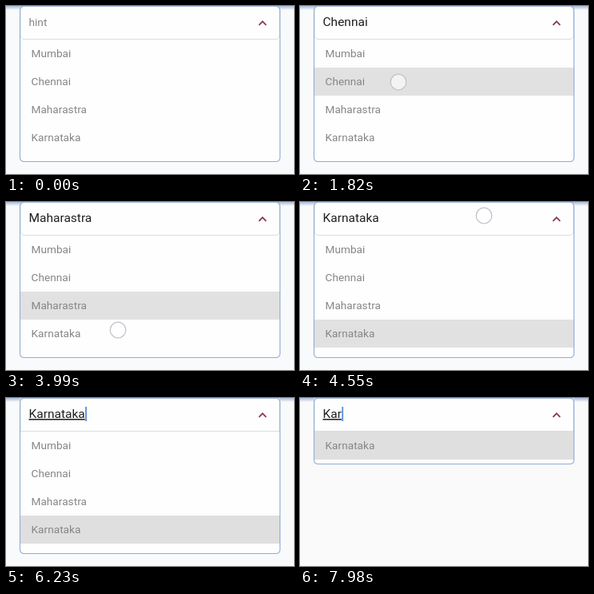
These frames come from a looping animation (360 by 210 pixels, 8000 ms). An HTML page:

```html
<!DOCTYPE html>
<html lang="en">
<head>
<meta charset="utf-8">
<title>Dropdown with search</title>
<style>
  html, body { margin: 0; width: 100%; height: 100%; overflow: hidden; background: #f9fafb; }
  svg { display: block; width: 360px; height: 210px; font-family: Roboto, sans-serif; }
  .item { font-size: 13.6px; letter-spacing: .04px; fill: #858585; }
  #value { font-size: 15.5px; fill: #202020; }
  #value.hint { font-size: 13.7px; fill: #858585; }
  #value.editing { text-decoration: underline; }
</style>
</head>
<body>
<svg viewBox="0 0 360 210">
  <defs>
    <linearGradient id="shade" x2="0" y2="1">
      <stop stop-color="#a9bad8"/>
      <stop offset="1" stop-color="#a9bad8" stop-opacity="0"/>
    </linearGradient>
  </defs>
  <rect id="back" width="360" height="210"/>
  <rect width="360" height="5" fill="url(#shade)"/>
  <rect id="panel" x="17.5" y="0.3" width="325" rx="5" fill="#fefefe"/>
  <rect id="mark" x="18" width="324"/>
  <g id="items"></g>
  <rect id="field" x="18" y="0.5" width="324" height="41" fill="#fefefe" stroke="#d9dde5"/>
  <rect id="border" x="17.5" y="0.3" width="325" rx="5" fill="none" stroke="#91add6" stroke-width="1.1"/>
  <text id="value" x="28.5" y="25"></text>
  <rect id="caret" y="11" width="1.8" height="18" fill="#5590d2"/>
  <path d="M316.2 23.8 L320.7 19.3 L325.2 23.8" fill="none" stroke="#8c3b50" stroke-width="1.8"/>
  <circle id="dot" r="9.8" fill="#fff" fill-opacity=".6" stroke="#c0c4cb" stroke-width="1.3"/>
</svg>
<script>
const LOOP = 8000, ROW = 35, TOP = 42;
const FOCUS = 5180, ERASE = 6510, ERASE_STEP = 280;
const names = ["Mumbai", "Chennai", "Maharastra", "Karnataka"];
const picks = [350, 1680, 3150, 4130];

// Touches: start, end, position
const taps = [
  { from: 70, to: 980, x: 118, y: 63 },
  { from: 1400, to: 2250, x: 123, y: 95 },
  { from: 2870, to: 3600, x: 132, y: 130 },
  { from: 3780, to: 4400, x: 140, y: 160 },
  { from: 4440, to: 5180, x: 230, y: 17 }
];

const $ = id => document.getElementById(id);
const set = (id, attrs) => {
  for (const key in attrs) $(id).setAttribute(key, attrs[key]);
};
const clamp = v => Math.max(0, Math.min(1, v));

const labels = names.map((name, i) => {
  const label = document.createElementNS("http://www.w3.org/2000/svg", "text");
  label.textContent = name;
  label.setAttribute("class", "item");
  label.setAttribute("x", 31.5);
  label.setAttribute("y", 64.4 + i * ROW);
  $("items").append(label);
  return label;
});

function draw(t) {
  const picked = picks.filter(time => t >= time).length - 1;
  const focused = t >= FOCUS;
  const erased = t < ERASE ? 0 : 1 + Math.floor((t - ERASE) / ERASE_STEP);
  const filtered = erased > 0;

  const value = $("value");
  const name = names[picked] || "hint";
  value.textContent = name.slice(0, name.length - erased);
  value.setAttribute("class", picked < 0 ? "hint" : focused ? "editing" : "");

  labels.forEach((label, i) => {
    label.textContent = filtered ? (i ? "" : name) : names[i];
  });

  const height = filtered ? 82.2 : 194.2;
  set("back", { fill: filtered ? "#fafafa" : "#f9fafb" });
  set("panel", { height });
  set("border", { height });
  set("field", { rx: focused ? 0 : 5 });

  const row = filtered ? 0 : picked;
  set("mark", {
    y: row > 0 ? TOP + row * ROW : 35,
    height: row > 0 ? ROW : 42,
    fill: focused ? "#dfdfdf" : "#e1e1e1",
    opacity: picked < 0 ? 0 : 1
  });

  // The caret blinks, starting anew after each edit
  const since = filtered ? (t - ERASE) % ERASE_STEP : t - FOCUS;
  set("caret", {
    x: 28.9 + value.getComputedTextLength(),
    opacity: focused && since % 1000 < 500 ? 1 : 0
  });

  const tap = taps.find(p => t >= p.from && t < p.to);
  set("dot", tap
    ? { cx: tap.x, cy: tap.y, opacity: Math.min(clamp((t - tap.from + 70) / 140), clamp((tap.to - t) / 210)) }
    : { opacity: 0 });
}

const start = performance.now();
function tick() {
  draw((performance.now() - start) % LOOP);
  requestAnimationFrame(tick);
}
tick();
</script>
</body>
</html>
```
